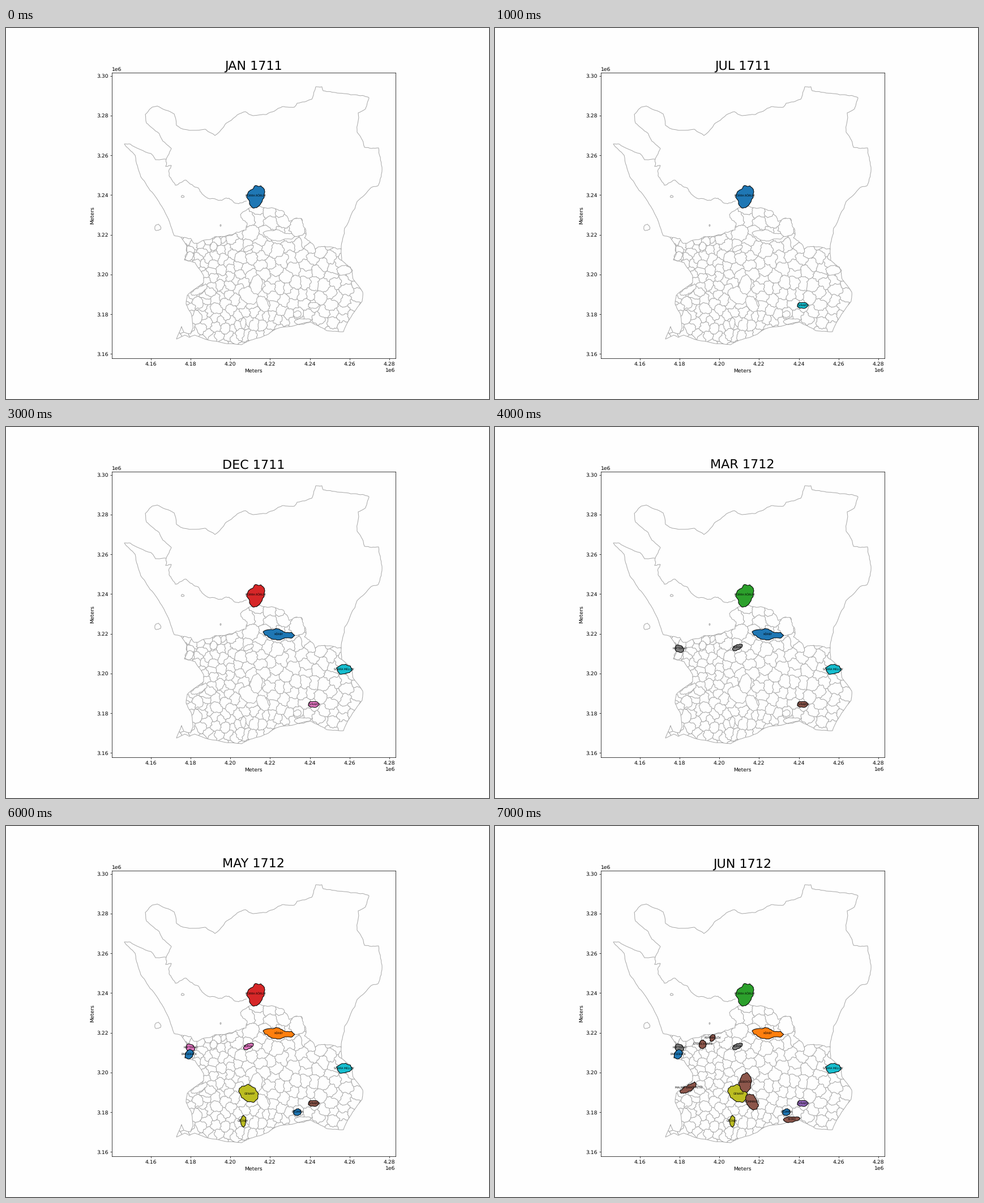
Recreate the animation shown at these times as a matplotlib script. Size 853 px wide and 656 px high, loop 8000 ms.

```python
import numpy as np
import matplotlib.pyplot as plt
from matplotlib.animation import FuncAnimation
from matplotlib.collections import LineCollection
from matplotlib.patches import Polygon
from matplotlib.path import Path
from matplotlib.tri import Triangulation

W, H, DPI = 853, 656, 64
PT = 100 / 96                # point size correction for this dpi
SCALE = 20000 / 70.25        # metres per stage pixel
LEFT, TOP, RIGHT, BOTTOM = 187, 78.8, 687.5, 583.8
GREY, PAPER = "darkgrey", "#fefefe"
rng = np.random.default_rng(1712)

plt.rcParams.update({"font.family": "DejaVu Sans", "font.size": 10 * PT,
                     "text.hinting": "none", "axes.facecolor": PAPER})

MONTHS = ["JAN 1711", "JUL 1711", "OCT 1711", "DEC 1711",
          "MAR 1712", "APR 1712", "MAY 1712", "JUN 1712"]


def to_map(p):
    """Stage pixels to map metres."""
    p = np.asarray(p, float)
    return np.column_stack([4.16e6 + (p[:, 0] - 255.5) * SCALE,
                            3.30e6 - (p[:, 1] - 84.5) * SCALE])


def ragged(p, amp, depth=3):
    """Roughen a line by midpoint displacement."""
    p = np.asarray(p, float)
    for _ in range(depth):
        d = np.diff(p, axis=0)
        normal = np.column_stack([-d[:, 1], d[:, 0]])
        mid = p[:-1] + d / 2 + rng.uniform(-amp, amp, (len(d), 1)) * normal
        out = np.empty((2 * len(p) - 1, 2))
        out[0::2], out[1::2] = p, mid
        p = out
    return p


def blob(x, y, w, h, tilt=0, amp=0.14):
    """Rough closed outline around a tilted ellipse."""
    a = np.linspace(0, 2 * np.pi, 10)[:-1]
    r = rng.uniform(0.88, 1.15, len(a)) / 2
    u, v = w * r * np.cos(a), h * r * np.sin(a)
    c, s = np.cos(np.radians(tilt)), np.sin(np.radians(tilt))
    p = np.column_stack([x + c * u - s * v, y + s * u + c * v])
    return ragged(np.vstack([p, p[:1]]), amp)


# Corners of the coast and borders; the detail between them is random.
WEST = [(309, 370), (297, 367), (279, 322), (261, 294), (238, 263), (228, 225),
        (209, 205), (219, 205), (256, 222), (264, 233), (283, 232), (292, 213),
        (277, 200), (270, 186), (248, 168), (246, 153), (258, 140), (267, 138),
        (297, 152), (301, 172), (308, 177)]
NORTH = [(308, 177), (352, 179), (369, 190), (388, 169), (408, 154), (423, 148),
         (436, 155), (460, 153), (488, 139), (509, 140), (514, 133), (540, 126),
         (547, 104), (558, 104), (560, 111), (585, 115), (617, 118), (641, 123)]
EAST = [(641, 123), (635, 143), (622, 150), (620, 184), (628, 196), (633, 211),
        (658, 212), (664, 246), (657, 279), (645, 282), (620, 307), (598, 354),
        (592, 390)]
SOUTH = [(592, 390), (593, 411), (609, 425), (613, 444), (630, 467), (629, 483),
         (612, 506), (596, 537), (566, 535), (538, 520), (499, 528), (477, 532),
         (464, 541), (432, 552), (416, 560), (384, 557), (333, 543), (324, 547),
         (316, 543), (301, 550), (310, 528), (314, 538), (326, 541), (330, 531),
         (327, 505), (318, 488), (320, 473), (349, 450), (349, 438), (334, 415),
         (315, 410), (320, 400), (319, 385), (309, 370)]
INNER = [(283, 232), (282, 245), (292, 243), (288, 261), (299, 278), (318, 269),
         (340, 283), (346, 293), (376, 305), (394, 301), (406, 310), (425, 306)]
PARISH_TOP = [(309, 370), (326, 372), (333, 381), (350, 375), (390, 367),
              (424, 357), (426, 345), (414, 330), (434, 317), (462, 319),
              (490, 324), (500, 342), (522, 337), (529, 356), (527, 371),
              (546, 391), (565, 387), (592, 390)]

fig = plt.figure(figsize=(W / DPI, H / DPI), dpi=DPI, facecolor=PAPER)
ax = fig.add_axes([LEFT / W, 1 - BOTTOM / H,
                   (RIGHT - LEFT) / W, (BOTTOM - TOP) / H])
(x0, y1), (x1, y0) = to_map([(LEFT, TOP), (RIGHT, BOTTOM)])
ax.set(xlim=(x0, x1), ylim=(y0, y1), xlabel="Meters", ylabel="Meters")
title = ax.set_title("", fontsize=24 * PT)
for side in ax.spines.values():
    side.set_linewidth(0.8 * PT)


def add_lines(lines, zorder, width=1.1):
    lines = LineCollection([to_map(p) for p in lines], colors=GREY,
                           linewidths=width * PT, zorder=zorder)
    ax.add_collection(lines, autolim=False)
    return lines


class Parish:
    def __init__(self, name, start, x, y, w, h, tilt=0):
        self.start, self.seed = start, (x, y)
        self.shape = ax.add_patch(
            Polygon(to_map(blob(x, y, w, h, tilt)), linewidth=1.1 * PT))
        (mx, my), = to_map([self.seed])
        self.label = ax.text(mx, my, name, fontsize=5 * PT, ha="center",
                             va="center", zorder=5)

    def show(self, colour):
        on = colour is not None
        self.shape.set(facecolor=colour if on else PAPER,
                       edgecolor="black" if on else GREY,
                       zorder=4 if on else 2)
        self.label.set_visible(on)


# Name, month index, centre, width, height, tilt in degrees
PARISHES = [
    Parish("NORRA RÖRUM", 0, 441, 297, 28, 39, 20),
    Parish("ÖVRABY", 1, 543, 491, 20, 11),
    Parish("SÖDRA MELLBY", 2, 597, 429, 27, 17),
    Parish("HÖRBY", 3, 482, 367, 60, 16, 4),
    Parish("HÖFTERUP", 4, 326, 392, 18, 12, 30),
    Parish("HURVA", 4, 428, 390, 19, 10, -30),
    Parish("BARSEBÄCK", 5, 324, 404, 14, 17, 30),
    Parish("BROMMA", 5, 515, 506, 14, 12),
    Parish("GENARP", 6, 430, 474, 37, 29, 30),
    Parish("GRÖNBY", 6, 419, 522, 10, 20),
    Parish("VEBERÖD", 7, 443, 453, 21, 33),
    Parish("RÖMMINGE", 7, 454, 488, 18, 30, -25),
    Parish("MALMÖ SANKT PETRI", 7, 342, 463, 33, 12, -28),
    Parish("STORA HARRIE", 7, 367, 386, 13, 15),
    Parish("REMMARLÖV", 7, 384, 375, 9, 13, 25),
    Parish("YSTAD", 7, 523, 519, 30, 9, -5),
]


def spacing(x, y):
    """Smallest parish width and height around a point."""
    if y < 385 and x > 400:
        return 19, 16
    if x < 366 and 465 < y < 512:
        return 19, 6.5
    if y > 505 and x < 480:
        return 8.5, 15
    return (11, 10.5) if x < 410 else (14.5, 13)


def parish_seeds():
    seeds = [p.seed for p in PARISHES]
    for x, y in rng.uniform((290, 300), (645, 575), (7000, 2)):
        gap = (np.array(seeds) - (x, y)) / spacing(x, y)
        if (gap ** 2).sum(axis=1).min() > 1:
            seeds.append((x, y))
    return np.array(seeds)


def voronoi_edges(seeds):
    tri = Triangulation(*seeds.T)
    a, b, c = (seeds[tri.triangles[:, i]] for i in range(3))
    u, v = b - a, c - a
    cross = 2 * (u[:, 0] * v[:, 1] - u[:, 1] * v[:, 0])
    uu, vv = (u ** 2).sum(axis=1), (v ** 2).sum(axis=1)
    centre = a + np.column_stack([v[:, 1] * uu - u[:, 1] * vv,
                                  u[:, 0] * vv - v[:, 0] * uu]) / cross[:, None]
    for i, near in enumerate(tri.neighbors):
        for j in near:
            if j > i and np.hypot(*(centre[i] - centre[j])) < 60:
                yield ragged(centre[[i, j]], 0.26)


south, top = ragged(SOUTH, 0.04), ragged(PARISH_TOP, 0.15)
mesh = add_lines(list(voronoi_edges(parish_seeds())), 1, 1.2)
mesh.set_clip_path(Path(to_map(np.vstack([top, south]))), ax.transData)
islets = [blob(268, 353, 12, 11), blob(312, 298, 5, 4), blob(379, 349, 2, 3)]
add_lines([south, top, ragged(WEST, 0.05), ragged(NORTH, 0.07),
           ragged(EAST, 0.07), ragged(INNER, 0.15)] + islets, 3)


def draw(k):
    title.set_text(MONTHS[k])
    # Colours follow the alphabetical order of the months reached so far.
    months = sorted(MONTHS[:k + 1])
    for p in PARISHES:
        if p.start > k:
            p.show(None)
        else:
            rank = months.index(MONTHS[p.start])
            p.show(f"C{min(9, 10 * rank // max(k, 1))}")
    return []


anim = FuncAnimation(fig, draw, frames=len(MONTHS), interval=1000,
                     repeat=True, repeat_delay=0)
plt.show()
```
